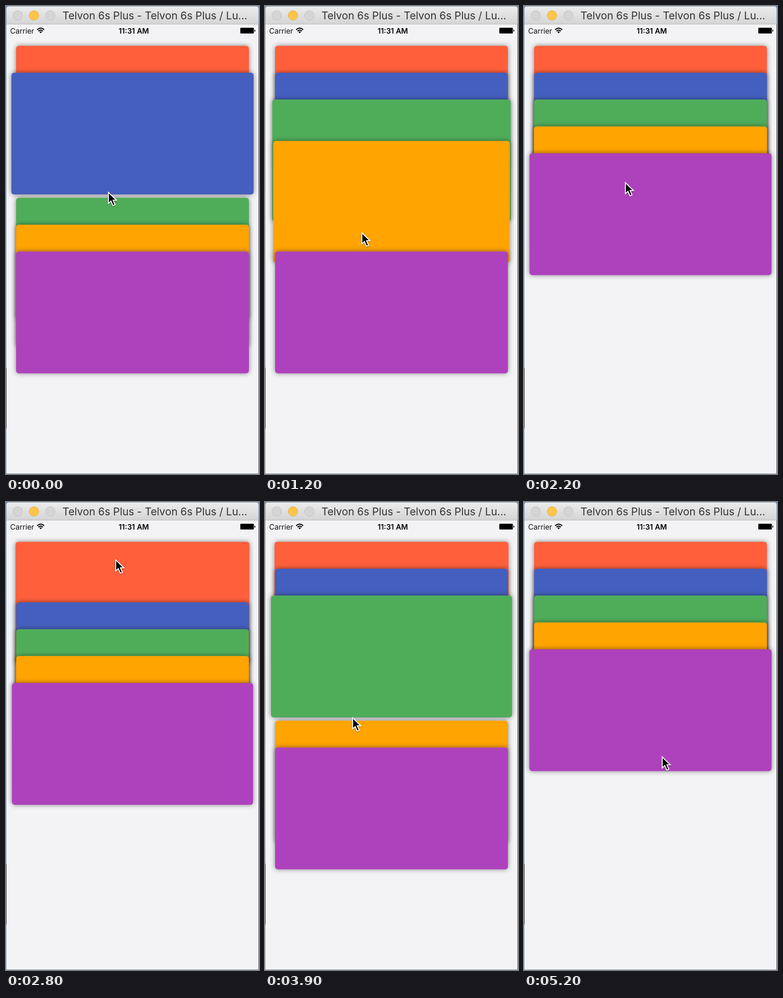
Write an HTML page that moves like this. It is 551 px wide and 1017 px high and loops after 5.3 s.

```html
<!DOCTYPE html>
<html lang="en">
<head>
<meta charset="utf-8">
<title>Card accordion</title>
<style>
  html, body { margin: 0; width: 100%; height: 100%; overflow: hidden; background: #f3f3f5; }
  svg { display: block; width: 551px; height: 1017px; }
  text { font-family: Inter, Roboto, sans-serif; }
</style>
</head>
<body>
<svg viewBox="0 0 551 1017" xmlns="http://www.w3.org/2000/svg">
  <defs>
    <linearGradient id="bar" x2="0" y2="1">
      <stop stop-color="#ececec"/><stop offset="1" stop-color="#d4d4d4"/>
    </linearGradient>
    <filter id="shadow" filterUnits="userSpaceOnUse" x="-30" y="40" width="611" height="800">
      <feDropShadow dx="0" dy="0" stdDeviation="5.5" flood-color="#000" flood-opacity=".48"/>
    </filter>
    <filter id="soft" x="-50%" y="-50%" width="200%" height="200%">
      <feDropShadow dx="0" dy="1.5" stdDeviation="1.2" flood-color="#000" flood-opacity=".35"/>
    </filter>
  </defs>

  <rect width="551" height="1017" fill="#f3f3f5"/>
  <g id="cards"></g>

  <rect width="551" height="40" fill="#6f8fb5"/>
  <path d="M1 40V6Q1 1 6 1H545Q550 1 550 6V40Z" fill="url(#bar)"/>
  <path d="M1 39.5H550" stroke="#b9b9b9"/>
  <g fill="#d5d5d5" stroke="#bfbfbf">
    <circle cx="25.5" cy="20.5" r="10.3"/>
    <circle cx="61" cy="20.5" r="10.3" fill="#fec548" stroke="#e2ad45"/>
    <circle cx="96.5" cy="20.5" r="10.3"/>
  </g>
  <text x="123" y="29" font-size="22.8" fill="#333">Telvon 6s Plus - Telvon 6s Plus / Lu...</text>

  <text x="9" y="59.5" font-size="16" fill="#111">Carrier</text>
  <g fill="none" stroke="#000" stroke-width="2.3">
    <path d="M67.8 51.6Q75.5 44.6 83.2 51.6M70.6 54.6Q75.5 50.2 80.4 54.6"/>
    <path d="M72.6 56.3Q75.5 54 78.4 56.3L75.5 59.3Z" fill="#000" stroke="none"/>
  </g>
  <text x="278.3" y="59.5" font-size="16" font-weight="600" text-anchor="middle" fill="#000">11:31 AM</text>
  <rect x="510" y="47" width="30" height="13" rx="2" fill="#444"/>
  <rect x="511" y="48" width="28" height="11" rx="1.2"/>
  <path d="M541 51Q543 51.5 543 53.5T541 56Z"/>

  <path d="M.5 40V786M.5 918V1017" stroke="#7d9bbb"/>
  <path d="M.5 786V918" stroke="#111"/>
  <path d="M550.5 40V1017" stroke="#333a44"/>
  <path d="M0 1016.5H551" stroke="#71869c"/>

  <g id="cursor" filter="url(#soft)">
    <path d="M1 2V26L6.6 20.8L11 30.8L15.4 28.9L11.2 19.1H18.6Z"
      stroke="#fff" stroke-width="2" stroke-linejoin="miter"/>
  </g>
</svg>
<script>
const LOOP = 5300, STEP = 100, MOVE = 300, WIDEN = 500;
const FIRST_TOP = 86.5, PEEK = 58.4, OPEN_SHIFT = 213.5, CARD_HEIGHT = 264.7;
const COLORS = ['#ff5f3b', '#455fbe', '#50ad5a', '#ffa400', '#ae43bc'];

// [time, selected card]
const taps = [[-1000, 1], [300, 2], [980, 3], [1755, 4], [2678, 0], [3520, 2], [4560, 4]];
// [time, x, y] of the pointer tip
const pointer = [
  [0, 222, 403], [250, 217, 436], [500, 216, 440], [900, 211, 490], [1200, 210, 491],
  [1650, 208, 549], [1900, 208, 550], [2600, 238, 123], [2850, 238, 124],
  [3300, 192, 423], [3650, 191, 428], [4350, 187, 562], [4650, 187, 562], [5200, 300, 552]
];

const clamp = v => Math.max(0, Math.min(1, v));
const mix = (a, b, p) => a + (b - a) * p;
const smooth = p => p * p * (3 - 2 * p);

// cubic-bezier(.42, 0, .58, 1)
function easeInOut(x) {
  x = clamp(x);
  let lo = 0, hi = 1;
  for (let i = 0; i < 24; i++) {
    const s = (lo + hi) / 2, r = 1 - s;
    if (3 * r * r * s * .42 + 3 * r * s * s * .58 + s ** 3 < x) lo = s; else hi = s;
  }
  return smooth(lo);
}

const cards = COLORS.map(fill => {
  const card = document.createElementNS('http://www.w3.org/2000/svg', 'rect');
  const attrs = { fill, rx: 6, height: CARD_HEIGHT, filter: 'url(#shadow)' };
  for (const name in attrs) card.setAttribute(name, attrs[name]);
  return document.getElementById('cards').appendChild(card);
});
const cursor = document.getElementById('cursor');

const topOf = (i, selected) => FIRST_TOP + PEEK * i + (i > selected ? OPEN_SHIFT : 0);
const leftOf = (i, selected) => i === selected ? 11.7 : 22;

function render(t) {
  const k = taps.findLastIndex(tap => tap[0] <= t);
  const [start, now] = taps[k];
  const before = k ? taps[k - 1][1] : now;
  const move = easeInOut((t - start) / MOVE);
  const widen = easeInOut((t - start) / WIDEN);
  cards.forEach((card, i) => {
    const left = mix(leftOf(i, before), leftOf(i, now), widen);
    card.setAttribute('x', left);
    card.setAttribute('width', 551 - 2 * left);
    card.setAttribute('y', mix(topOf(i, before), topOf(i, now), move));
  });

  const n = Math.min(pointer.findLastIndex(key => key[0] <= t), pointer.length - 2);
  const [t0, x0, y0] = pointer[n], [t1, x1, y1] = pointer[n + 1];
  const p = smooth(clamp((t - t0) / (t1 - t0)));
  cursor.setAttribute('transform', `translate(${mix(x0, x1, p)} ${mix(y0, y1, p)})`);
}

const origin = performance.now();
function tick() {
  const t = Math.max(0, performance.now() - origin) % LOOP;
  render(Math.floor(t / STEP) * STEP);
  requestAnimationFrame(tick);
}
tick();
</script>
</body>
</html>
```
